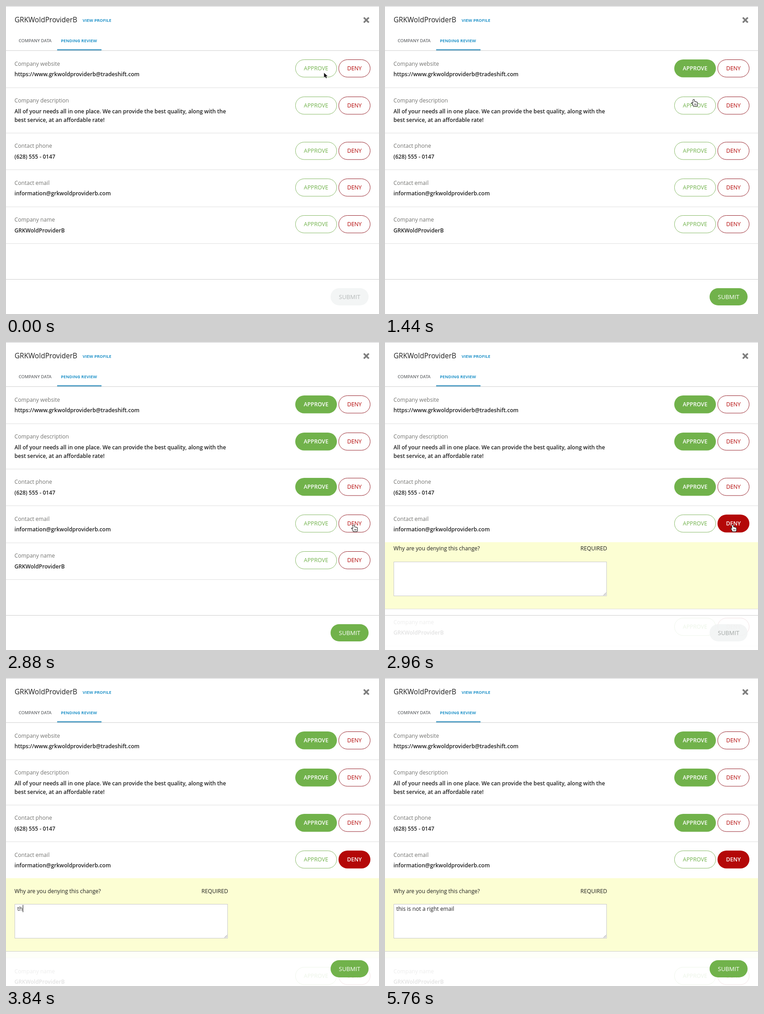
Animation, 824 px wide and 680 px high, one loop 5960 ms. Source, as an HTML page with a canvas:

```html
<!DOCTYPE html>
<html lang="en">
<head>
<meta charset="utf-8">
<title>Pending review</title>
<style>
  html, body { margin: 0; width: 100%; height: 100%; overflow: hidden; background: #fff; }
  canvas { display: block; }
</style>
</head>
<body>
<canvas id="stage" width="824" height="680"></canvas>
<script>
const ctx = document.getElementById('stage').getContext('2d');
const LOOP = 5960, STEP = 80, LAST = 5760;
const GREEN = '#71b24b', RED = '#b40808', BLUE = '#2a97cb', INK = '#1f1f1f', EDGE = '#c9c9cb';
const BODY = 12.1, SMALL = 9.5, LEFT = 18.8;
const COMPANY = 'GRKWoldProviderB';
const NOTE = 'this is not a right email';
const FOCUS_AT = 3440, TYPE_AT = 3760, PAUSE_AT = 4480;

const rows = [
  ['Company website', 'https://www.grkwoldproviderb@tradeshift.com'],
  ['Company description',
    'All of your needs all in one place. We can provide the best quality, along with the',
    'best service, at an affordable rate!'],
  ['Contact phone', '(628) 555 - 0147'],
  ['Contact email', 'information@grkwoldproviderb.com'],
  ['Company name', COMPANY]
].map(([label, ...lines]) => ({ label, lines }));

// Rows stack below the tabs; each is answered a fixed beat after the one above
const DENIED = 3;
let flow = 98.9;
rows.forEach((row, i) => {
  row.y = flow;
  row.height = 81.4 + 18.6 * (row.lines.length - 1);
  row.answerAt = i <= DENIED ? 880 + 680 * i : Infinity;
  flow += row.height;
});
const DENY_AT = rows[DENIED].answerAt;

// The pointer rests at each stop from arrive until leave
const stops = [
  { arrive: 0, leave: 160, x: 702, y: 147 },
  ...rows.slice(0, DENIED + 1).map(({ y, answerAt }, i) => ({
    arrive: answerAt - 160, leave: answerAt + 40,
    x: i === DENIED ? 768 : 682, y: y + (i === DENIED ? 43 : 27)
  })),
  { arrive: 3200, leave: 3200, x: 413, y: 498 },
  { arrive: 3360, leave: TYPE_AT, x: 370, y: 522 }
];

const clamp = v => Math.max(0, Math.min(1, v));
const ease = p => p * p * (3 - 2 * p);

function text(str, x, y, { color = INK, size = BODY, weight = 400, align = 'left' } = {}) {
  ctx.font = `${weight} ${size}px "Open Sans", sans-serif`;
  ctx.textAlign = align;
  ctx.fillStyle = color;
  ctx.fillText(str, x, y);
}

function rect(x, y, w, h, color) {
  ctx.fillStyle = color;
  ctx.fillRect(x, y, w, h);
}

const rule = (y, color) => rect(0, Math.round(y - 0.5), 824, 1, color);

function strokeLines(color, width, ...lines) {
  ctx.strokeStyle = color;
  ctx.lineWidth = width;
  ctx.beginPath();
  for (const [x1, y1, x2, y2] of lines) {
    ctx.moveTo(x1, y1);
    ctx.lineTo(x2, y2);
  }
  ctx.stroke();
}

function pill(x, y, w, h, fill, stroke) {
  ctx.beginPath();
  ctx.roundRect(x, y, w, h, h / 2);
  ctx.fillStyle = fill;
  ctx.fill();
  if (!stroke) return;
  ctx.strokeStyle = stroke;
  ctx.lineWidth = 1;
  ctx.stroke();
}

function choice(str, x, y, w, color, border, chosen) {
  if (chosen) pill(x, y, w, 39.5, color);
  else pill(x + 0.5, y + 0.5, w - 1, 38.5, '#fff', border);
  text(str, x + w / 2, y + 24.1, chosen
    ? { color: '#fff', weight: 600, align: 'center' }
    : { color, size: 12.3, weight: 500, align: 'center' });
}

function header() {
  rect(0, 0, 824, 1, EDGE);
  text(COMPANY, 19, 35.5, { size: 15.57 });
  text('VIEW PROFILE', 169.3, 35.3, { color: BLUE, size: 9.25, weight: 700 });
  text('COMPANY DATA', 28, 80, { color: '#6c6f72', size: SMALL, weight: 600 });
  text('PENDING REVIEW', 121.3, 80, { color: BLUE, size: 9.25, weight: 700 });
  rule(98.5, '#cfcfcf');
  rect(113, 95.5, 98, 2.5, '#4399c3');
  const x = 796, y = 31, r = 5.5;
  strokeLines('#7d7d7d', 3.7, [x - r, y - r, x + r, y + r], [x + r, y - r, x - r, y + r]);
}

function drawRow(row, i, shift, t) {
  const y = row.y + shift;
  const answered = t >= row.answerAt;
  text(row.label, LEFT, y + 33, { color: '#737370' });
  row.lines.forEach((line, n) => text(line, LEFT, y + 56.5 + n * 19, { weight: 600 }));
  const top = Math.round(y + 19.3);
  choice('APPROVE', 639, top, 92, GREEN, '#86b965', answered && i !== DENIED);
  choice('DENY', 734.5, top, 70.5, RED, '#97232c', answered && i === DENIED);
  rule(y + row.height, '#dfdfdf');
}

function typedCount(t) {
  if (t < TYPE_AT) return 0;
  if (t <= PAUSE_AT) return 1 + Math.floor((t - TYPE_AT) / (PAUSE_AT - TYPE_AT) * 11);
  return Math.min(NOTE.length, 12 + Math.floor((t - PAUSE_AT) / 76));
}

function reasonPanel(height, open, t) {
  const y = 460.3 + 14.5 * open;
  rect(0, 442, 824, height + 1, '#fcfed3');
  rule(443 + height, '#dedede');
  text('Why are you denying this change?', LEFT, y);
  text('REQUIRED', 431.8, y);

  const top = Math.round(y + 24.3), right = 489.5, bottom = top + 75.5;
  rect(19, top, 471, 76, '#fff');
  ctx.strokeStyle = EDGE;
  ctx.lineWidth = 1;
  ctx.strokeRect(19.5, top + 0.5, 470, 75);
  strokeLines('#888', 1, ...[4, 7].map(d => [right - d, bottom - 1, right - 1, bottom - d]));

  const typed = NOTE.slice(0, typedCount(t));
  text(typed, 24.9, top + 14.7);
  if (t >= FOCUS_AT && t < 5600) {
    rect(Math.round(24.9 + ctx.measureText(typed).width), top + 2, 1, 16, '#111');
  }
}

function footer(t) {
  rect(0, 604, 824, 76, 'rgba(255,255,255,.87)');
  rule(603.5, '#cdcdcd');
  const denied = t >= DENY_AT;
  const active = t >= (denied ? TYPE_AT : rows[0].answerAt);
  pill(717, 623, 84, 38, active ? GREEN : 'rgba(241,244,244,.85)');
  const color = active ? '#fff' : denied ? '#a0a5a3' : '#b5b9b9';
  text('SUBMIT', 759, 646.6, { color, size: 12.97, align: 'center' });
}

function outlined(addShapes, fill, line, width) {
  ctx.beginPath();
  addShapes();
  ctx.lineJoin = 'round';
  ctx.lineWidth = width;
  ctx.strokeStyle = line;
  ctx.stroke();
  ctx.fillStyle = fill;
  ctx.fill();
}

function arrow() {
  outlined(() => {
    ctx.moveTo(0.5, 0.5);
    ctx.lineTo(0.5, 11);
    ctx.lineTo(3, 8.8);
    ctx.lineTo(4.8, 12.6);
    ctx.lineTo(6.7, 11.8);
    ctx.lineTo(5, 8);
    ctx.lineTo(8.3, 8);
    ctx.closePath();
  }, '#111', '#fff', 1.8);
}

function hand() {
  outlined(() => {
    ctx.roundRect(-1.3, -0.5, 2.6, 10, 1.3);
    for (let i = 1; i < 4; i++) ctx.roundRect(-1.3 + 2.3 * i, 3 + 0.7 * i, 2.4, 6, 1.2);
    ctx.roundRect(-1.3, 6.5, 9.3, 7, 2);
    ctx.moveTo(-4.4, 6.5);
    ctx.lineTo(0, 8);
    ctx.lineTo(0, 12);
    ctx.closePath();
  }, '#fff', '#111', 2);
  for (let i = 0; i < 3; i++) rect(1.5 + 1.9 * i, 8, 0.8, 3.6, '#222');
}

function beam() {
  rect(0, -6, 1, 12, '#222');
  for (const y of [-7, 6]) rect(-2, y, 5, 1, '#222');
}

function pointer(t) {
  if (t >= TYPE_AT) return;
  const i = stops.findLastIndex(stop => stop.arrive <= t);
  const from = stops[i], to = stops[i + 1] ?? from;
  const p = to === from ? 0 : ease(clamp((t - from.leave) / (to.arrive - from.leave)));
  const x = from.x + (to.x - from.x) * p;
  const y = from.y + (to.y - from.y) * p;
  const overButton = t >= 160 && x > 639 && rows.some(r => y > r.y + 19 && y < r.y + 59);
  ctx.save();
  ctx.translate(x, y);
  if (t > 3200) beam();
  else if (overButton) hand();
  else arrow();
  ctx.restore();
}

function draw(t) {
  rect(0, 0, 824, 680, '#fff');
  header();
  const denied = t >= DENY_AT;
  const open = clamp((t - DENY_AT - 40) / 160);
  const height = denied ? 146.5 + 29 * open : 0;
  rows.forEach((row, i) => drawRow(row, i, i > DENIED ? height : 0, t));
  if (denied) reasonPanel(height, open, t);
  footer(t);
  pointer(t);
}

let start;
function tick(now) {
  start ??= now;
  const t = (now - start) % LOOP;
  draw(Math.min(LAST, Math.floor(t / STEP) * STEP));
  requestAnimationFrame(tick);
}
draw(0);
requestAnimationFrame(tick);
</script>
</body>
</html>
```
